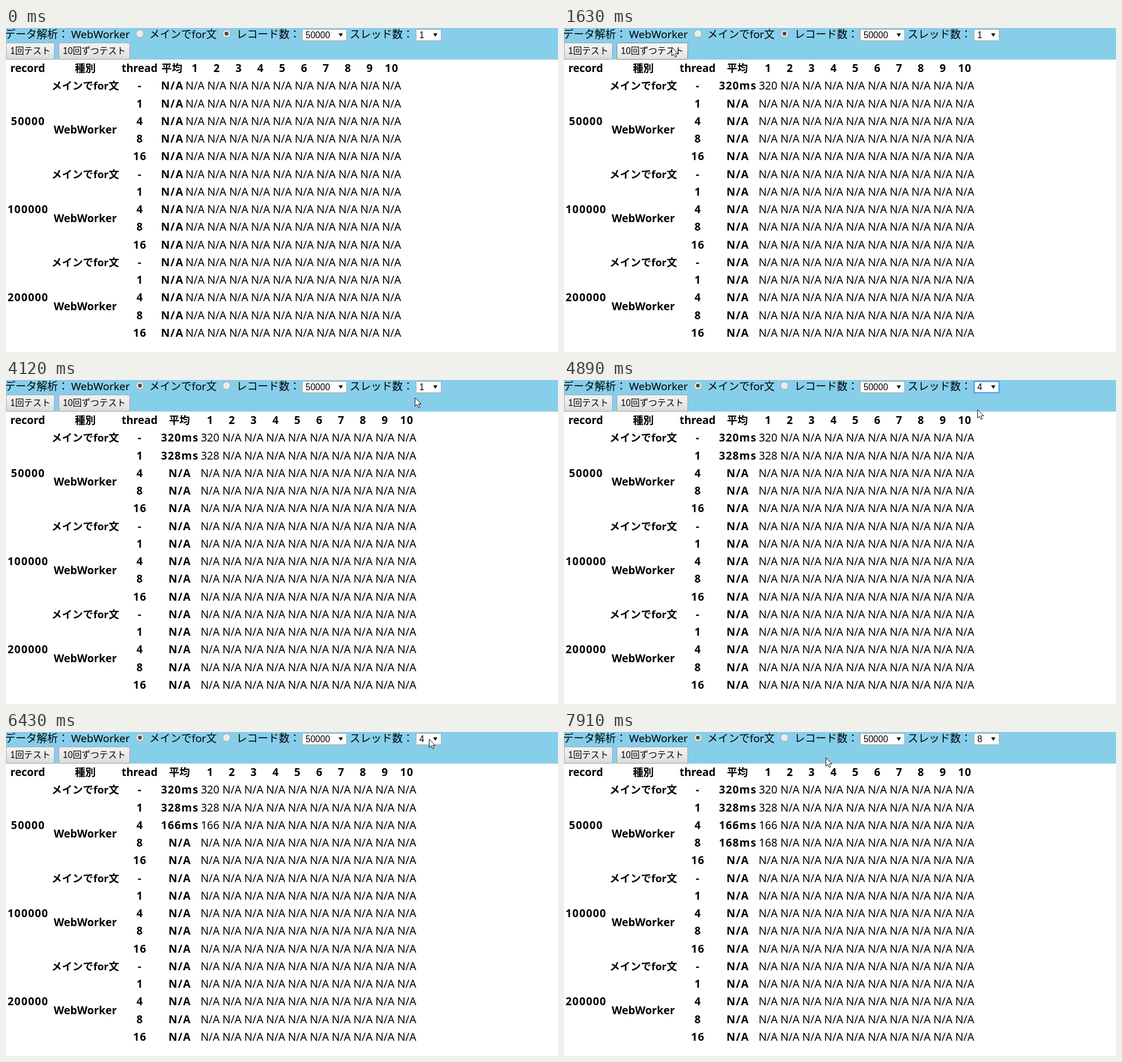
Recreate the animation shown at these times as an HTML page. Size 975 px wide and 574 px high, loop 8000 ms.

```html
<!DOCTYPE html>
<html lang="ja">
<head>
<meta charset="utf-8">
<style>
  html, body { margin: 0; width: 100%; height: 100%; overflow: hidden; background: #fff; }
  svg { display: block; width: 975px; height: 574px; }
  text { font: 400 18.75px "Noto Sans", "Noto Sans CJK JP", "Noto Sans CJK", sans-serif; white-space: pre; }
  .mid { text-anchor: middle; }
  .cell { font-size: 19px; font-weight: 350; }
  .bold { font-size: 19px; font-weight: 700; }
  .jp { font-size: 18.5px; }
  .num { letter-spacing: 1.2px; }
  .ui { font: 400 15.6px "Liberation Sans", "Noto Sans CJK JP", "Noto Sans CJK", sans-serif; }
</style>
</head>
<body>
<svg id="stage" viewBox="0 0 975 574">
  <defs>
    <linearGradient id="face" x2="0" y2="1">
      <stop stop-color="#f2f2f2"/><stop offset=".4" stop-color="#ececec"/><stop offset="1" stop-color="#dadada"/>
    </linearGradient>
    <linearGradient id="hover" x2="0" y2="1">
      <stop stop-color="#f6f6f6"/><stop offset=".4" stop-color="#f0f0f0"/><stop offset="1" stop-color="#e0e0e0"/>
    </linearGradient>
    <linearGradient id="down" x2="0" y2="1">
      <stop stop-color="#d6d6d6"/><stop offset="1" stop-color="#e8e8e8"/>
    </linearGradient>
  </defs>
</svg>
<script>
const LOOP = 8000;
const ROW = 31.25;
const COL = 38.6;
const stage = document.getElementById('stage');

function add(parent, tag, attrs, content) {
  const el = document.createElementNS('http://www.w3.org/2000/svg', tag);
  for (const key in attrs) el.setAttribute(key, attrs[key]);
  if (content !== undefined) el.textContent = content;
  parent.append(el);
  return el;
}
const label = (parent, x, y, str, cls = '') => add(parent, 'text', { x, y, class: cls }, str);
const set = (el, key, value) => {
  if (el.getAttribute(key) !== String(value)) el.setAttribute(key, value);
};
const write = (el, str) => { if (el.textContent !== str) el.textContent = str; };
const baseline = row => 78 + ROW * row;

// Toolbar
add(stage, 'rect', { width: 975, height: 56, fill: '#87ceeb' });
label(stage, -2, 17.5, 'データ解析：');
label(stage, 115, 17.5, 'WebWorker');
label(stage, 253, 17.5, 'メインでfor文');
label(stage, 407, 17.5, 'レコード数：');
label(stage, 607, 17.5, 'スレッド数：');

function radio(cx) {
  add(stage, 'circle', { cx, cy: 10, r: 6.7, fill: '#ececec', stroke: '#a0a0a0' });
  return add(stage, 'circle', { cx, cy: 10, r: 3.4, fill: '#4a4a4a' });
}
const workerDot = radio(236.5);
const mainDot = radio(389.5);

function button(x, width, str) {
  const face = add(stage, 'rect', { x: x + .5, y: 26.5, width: width - 1, height: 29, rx: 1.5, stroke: '#a3a3a3' });
  label(stage, x + width / 2, 46, str, 'ui mid');
  return { x, width, face };
}
const buttons = [button(0, 86, '1回テスト'), button(93, 126, '10回ずつテスト')];

function select(x, width, str) {
  const box = add(stage, 'rect', { x: x + .5, y: 2.5, width: width - 1, height: 20, fill: '#fff', stroke: '#a9a9a9' });
  const value = label(stage, x + 6, 18, str, 'ui');
  const ax = x + width - 14.5;
  add(stage, 'path', { d: `M${ax} 9.5h7.6l-3.8 6z` });
  return { box, value };
}
select(523, 79, '50000');
const threads = select(724, 45, '1');

// Result table
label(stage, 38.5, baseline(0), 'record', 'bold mid');
label(stage, 140, baseline(0), '種別', 'bold jp mid');
label(stage, 236, baseline(0), 'thread', 'bold mid');

['50000', '100000', '200000'].forEach((count, g) => {
  const top = g * 5 + 1;
  label(stage, 39, baseline(top + 2), count, 'bold num mid');
  label(stage, 140, baseline(top), 'メインでfor文', 'bold jp mid');
  label(stage, 140, baseline(top + 2.5), 'WebWorker', 'bold mid');
  ['-', '1', '4', '8', '16'].forEach((n, i) => label(stage, 236.5, baseline(top + i), n, 'bold num mid'));
});

const average = add(stage, 'g', {});
const samples = add(stage, 'g', {});
label(average, 293, baseline(0), '平均', 'bold jp mid');
for (let c = 0; c < 10; c++) label(samples, 334 + COL * c, baseline(0), c + 1, 'bold num mid');

const rows = [];
for (let r = 1; r <= 15; r++) {
  const mean = label(average, 293.7, baseline(r), 'N/A', 'bold num mid');
  const cells = [];
  for (let c = 0; c < 10; c++) cells.push(label(samples, 333.8 + COL * c, baseline(r), 'N/A', 'cell mid'));
  rows.push({ mean, first: cells[0] });
}

// Thread list
const OPTION = 20.4;
const popup = add(stage, 'g', {});
add(popup, 'rect', { x: 724.5, y: 22.5, width: 45, height: 82, fill: '#fff', stroke: '#8a8a8a' });
const mark = add(popup, 'rect', { x: 725, width: 44, height: OPTION, fill: '#1e90ff' });
const options = ['1', '4', '8', '16'].map((n, i) => label(popup, 730, 38.5 + OPTION * i, n, 'ui'));

const pointer = add(stage, 'path', {
  d: 'M.5 .5V15.5L4 12.3L6.4 17.7L8.9 16.6L6.6 11.4H11.2Z', fill: '#fff', stroke: '#111', 'stroke-width': 1
});

const bursts = [
  [150, 930, 11], [1010, 1310, 5], [1480, 2260, 11], [2330, 2800, 7], [3200, 3280, 2], [3510, 4270, 11],
  [4350, 4740, 6], [4890, 5660, 11], [5740, 6500, 11], [6580, 6750, 3], [7050, 7820, 11], [7910, 7910, 1]
];
const ticks = [0];
for (const [start, end, n] of bursts) {
  for (let i = 0; i < n; i++) {
    const t = n > 1 ? start + (end - start) * i / (n - 1) : start;
    ticks.push(Math.floor(t / 10) * 10);
  }
}

// Pointer path: time, x, y
const path = [
  [150, 852, 551], [930, 76, 60], [1160, 64, 40], [1480, 64, 40], [1630, 190, 34], [2100, 236, 9],
  [2330, 236, 9], [2800, 62, 37], [3510, 62, 37], [4120, 723, 31], [4270, 746, 13], [4420, 746, 13],
  [4740, 730, 52], [4890, 730, 52], [5500, 60, 40], [5810, 60, 40], [6420, 747, 12], [6500, 747, 12],
  [6750, 738, 65], [7050, 738, 65], [7500, 64, 40], [7740, 66, 40], [7820, 170, 40], [7910, 462, 45]
];

function pointerAt(t) {
  const i = path.findIndex(p => p[0] > t);
  if (i < 0) return path[path.length - 1].slice(1);
  if (i === 0) return path[0].slice(1);
  const [t0, x0, y0] = path[i - 1];
  const [t1, x1, y1] = path[i];
  const u = (t - t0) / (t1 - t0);
  const k = u * u * (3 - 2 * u);
  return [x0 + (x1 - x0) * k, y0 + (y1 - y0) * k];
}

const during = (t, spans) => spans.some(([a, b]) => t >= a && t < b);
const presses = [[1230, 1310], [3200, 3280], [5580, 5740], [7500, 7600]];
const opened = [[4350, 4890], [6490, 7050]];
const focused = [[4350, 5580], [6490, 7500]];
const results = [[1480, 320], [3510, 328], [5810, 166], [7910, 168]];

function draw(time) {
  const t = ticks.filter(tick => tick <= time).pop();
  const [x, y] = pointerAt(t);
  set(pointer, 'transform', `translate(${Math.round(x)} ${Math.round(y)})`);
  set(pointer, 'visibility', t < 150 ? 'hidden' : 'visible');

  const worker = t >= 2180;
  set(workerDot, 'visibility', worker ? 'visible' : 'hidden');
  set(mainDot, 'visibility', worker ? 'hidden' : 'visible');

  buttons.forEach(({ x: left, width, face }, i) => {
    const over = t >= 150 && x >= left && x < left + width && y >= 26 && y < 56;
    const down = i === 0 && during(t, presses);
    set(face, 'fill', `url(#${down ? 'down' : over ? 'hover' : 'face'})`);
    set(face, 'stroke', over ? '#858585' : '#a3a3a3');
  });

  const chosen = t >= 7050 ? 2 : t >= 4890 ? 1 : 0;
  const focus = during(t, focused);
  write(threads.value, options[chosen].textContent);
  set(threads.box, 'stroke', focus ? '#4a90e8' : '#a9a9a9');
  set(threads.box, 'stroke-width', focus ? 2 : 1);

  set(popup, 'display', during(t, opened) ? 'inline' : 'none');
  const active = y < 23 ? chosen : Math.min(3, Math.floor((y - 23) / OPTION));
  set(mark, 'y', 23 + OPTION * active);
  options.forEach((el, i) => set(el, 'fill', i === active ? '#fff' : '#000'));

  const wide = t >= results[0][0];
  set(average, 'transform', `translate(${wide ? 13.3 : 0} 0)`);
  set(samples, 'transform', `translate(${wide ? 26.7 : 0} 0)`);
  results.forEach(([at, ms], i) => {
    write(rows[i].mean, t >= at ? ms + 'ms' : 'N/A');
    write(rows[i].first, t >= at ? String(ms) : 'N/A');
  });
}

const begin = performance.now();
function frame() {
  draw((performance.now() - begin) % LOOP);
  requestAnimationFrame(frame);
}
frame();
</script>
</body>
</html>
```
